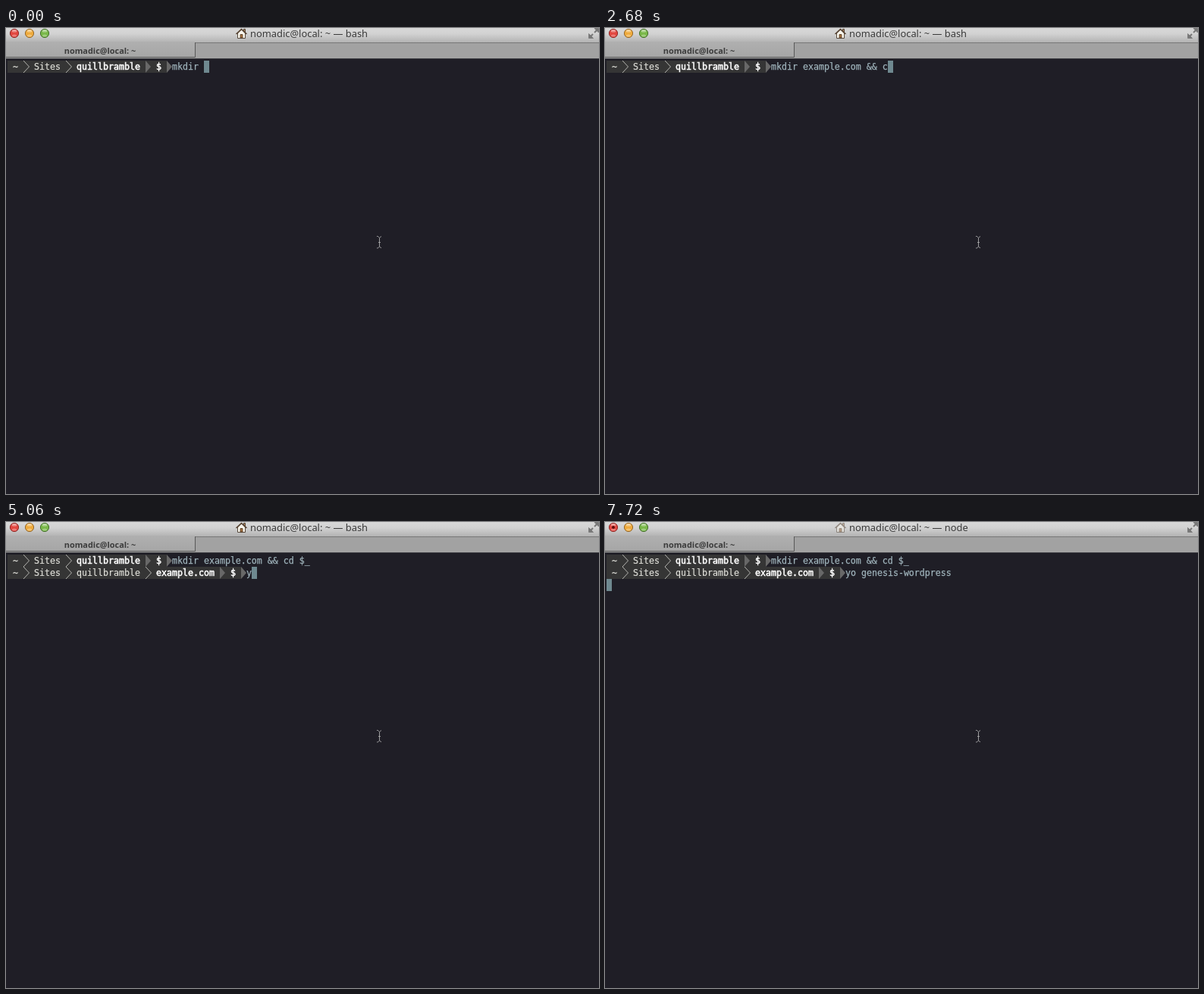
Recreate the animation shown at these times as an HTML page. Size 782x614 px, loop 8000 ms.

```html
<!DOCTYPE html>
<html lang="en">
<head>
<meta charset="utf-8">
<title>Terminal</title>
<style>
  html, body { margin: 0; width: 100%; height: 100%; overflow: hidden; background: #1f1e26; }
  svg { display: block; }
  text { white-space: pre; }
  .mono text { font: 11.627px "DejaVu Sans Mono", monospace; fill: #deded8; stroke: #deded8; stroke-width: .2; }
  .mono .strong { fill: #fff; stroke: #fff; stroke-width: .55; }
  .mono .command { fill: #9fb3bb; stroke: #9fb3bb; stroke-width: .25; }
  .title { font: 12.9px "Noto Sans", sans-serif; fill: #3a3a3a; }
  .tab { font: bold 10.9px "Noto Sans", sans-serif; fill: #3c3c3c; text-anchor: middle; }
</style>
</head>
<body>
<svg width="782" height="614" viewBox="0 0 782 614">
  <defs>
    <linearGradient id="bar" x2="0" y2="1">
      <stop stop-color="#d8d8d8"/><stop offset=".4" stop-color="#d2d2d2"/><stop offset="1" stop-color="#b2b2b2"/>
    </linearGradient>
    <linearGradient id="tabFill" x2="0" y2="1">
      <stop stop-color="#b0b0b0"/><stop offset="1" stop-color="#a6a6a6"/>
    </linearGradient>
    <linearGradient id="gloss" x2="0" y2="1">
      <stop stop-color="#fff" stop-opacity=".7"/><stop offset="1" stop-color="#fff" stop-opacity=".1"/>
    </linearGradient>
  </defs>

  <rect width="782" height="614" fill="#1f1e26"/>

  <rect width="782" height="19" fill="url(#bar)"/>
  <rect y="19" width="782" height="21" fill="#a2a2a2"/>
  <rect y="19" width="782" height="1" fill="#777"/>
  <rect y="18" width="249" height="20" fill="url(#tabFill)"/>
  <path d="M0 38.5H249.5V19" fill="none" stroke="#585858"/>
  <rect y="40" width="782" height="1" fill="#38383d"/>

  <g id="lights"></g>
  <circle id="busyDot" cx="11" cy="7" r="2" fill="#5c0b0b"/>

  <g id="home" stroke-linejoin="round">
    <path d="M305.5 7V13.5H315.5V7L310.5 2Z" fill="#faf6ec" stroke="#55483c"/>
    <path d="M313.5 5V1.5H315.5V6" fill="#b98b5e" stroke="#55483c"/>
    <path d="M303.5 8L310.5 1.5L317.5 8" fill="none" stroke="#54402f" stroke-width="1.5"/>
    <path d="M309 13V8.5H312V13Z" fill="#a7713d" stroke="#4f3928" stroke-width=".8"/>
  </g>
  <text id="title" class="title" x="322" y="12"></text>
  <text class="tab" x="124" y="34">nomadic@local: ~</text>

  <g fill="#777" stroke="#777">
    <path d="M768.5 7.5V13.5H774.5Z" stroke-width=".8"/>
    <path d="M776 .5H781.5V6Z" stroke-width=".8"/>
    <path d="M770 12L774 8M776 6L780 2" stroke-width="2"/>
  </g>

  <g class="mono">
    <g id="row0"></g>
    <g id="row1"></g>
  </g>
  <rect id="cursor" width="7" height="16" fill="#6f8990"/>

  <path d="M489 274.5H490.5L492.5 276.5V288L490.5 290H489M495 274.5L492.5 276.5M492.5 288L495 290M491 282.5H494"
        fill="none" stroke="#9c9c9e"/>
</svg>

<script>
const LOOP = 8000;
const CELL = 7, LINE = 16, LEFT = 2, TOP = 43;
const byId = id => document.getElementById(id);
const colX = col => LEFT + col * CELL;
const rowY = row => TOP + row * LINE;

const label = (col, row, str, cls = '') =>
  `<text class="${cls}" x="${colX(col)}" y="${rowY(row) + 12}">${str}</text>`;
const chevron = (col, row) =>
  `<path d="M${colX(col)} ${rowY(row)}l7.5 8l-7.5 8" fill="none" stroke="#b4b4b0"/>`;
const arrow = (col, row) =>
  `<path d="M${colX(col)} ${rowY(row)}l7 8l-7 8z" fill="#686868"/>`;

// Draws a path prompt and returns its command text with the column it starts in.
function buildPrompt(row, dirs) {
  let col = 1, marks = '';
  dirs.forEach((dir, i) => {
    const last = i === dirs.length - 1;
    marks += label(col, row, dir, last ? 'strong' : '');
    col += dir.length + 1;
    marks += (last ? arrow : chevron)(col, row);
    col += 2;
  });
  marks += label(col, row, '$', 'strong') + arrow(col + 2, row);
  const background =
    `<rect x="${LEFT}" y="${rowY(row)}" width="${(col + 2) * CELL}" height="${LINE}" fill="#353535"/>`;
  const start = col + 3;
  const group = byId('row' + row);
  group.innerHTML = background + marks + label(start, row, '', 'command');
  return { group, start, text: group.querySelector('.command') };
}

const dirs = ['~', 'Sites', 'quillbramble'];
const prompts = [buildPrompt(0, dirs), buildPrompt(1, [...dirs, 'example.com'])];
const commands = ['mkdir example.com && cd $_', 'yo genesis-wordpress'];

byId('lights').innerHTML = [['#e2463f', '#8e2a28'], ['#efab3c', '#94672a'], ['#79b848', '#44702d']]
  .map(([fill, rim], i) => {
    const x = 11 + 20 * i;
    return `<circle cx="${x}" cy="7" r="5.6" fill="${fill}" stroke="${rim}"/>
      <ellipse cx="${x}" cy="4.3" rx="3.2" ry="2" fill="url(#gloss)"/>
      <ellipse cx="${x}" cy="10" rx="3" ry="1.6" fill="#fff" opacity=".3"/>`;
  }).join('');

// Typing bursts: first step, last step, row, characters typed after each step.
const bursts = [
  [0, 0, 0, [6]],
  [600, 1640, 0, [7, 9, 10, 12, 13, 15, 16, 18]],
  [2380, 3270, 0, [19, 21, 22, 23, 24, 25, 26]],
  [3720, 3720, 1, [0]],
  [5060, 5210, 1, [1, 2]],
  [5660, 6240, 1, [3, 5, 7, 8, 10]],
  [6690, 7430, 1, [12, 14, 16, 17, 18, 20]],
  [7570, 7570, 2, [0]],
];
const NODE_START = 7720;

const steps = bursts.flatMap(([from, to, row, counts]) => counts.map((count, i) => ({
  at: from + (to - from) * i / Math.max(1, counts.length - 1), row, count,
})));

function render(time) {
  const { row, count } = steps.findLast(step => step.at <= time);
  prompts.forEach((prompt, i) => {
    prompt.group.style.display = i <= row ? '' : 'none';
    prompt.text.textContent = i < row ? commands[i] : commands[i].slice(0, count);
  });
  const start = row < prompts.length ? prompts[row].start : 0;
  byId('cursor').setAttribute('x', colX(start + count));
  byId('cursor').setAttribute('y', rowY(row));

  const running = time >= NODE_START;
  byId('title').textContent = 'nomadic@local: ~ — ' + (running ? 'node' : 'bash');
  byId('home').setAttribute('opacity', running ? .5 : 1);
  byId('busyDot').style.display = running ? '' : 'none';
}

const startTime = performance.now();
function tick() {
  render((performance.now() - startTime) % LOOP);
  requestAnimationFrame(tick);
}
tick();
</script>
</body>
</html>
```
